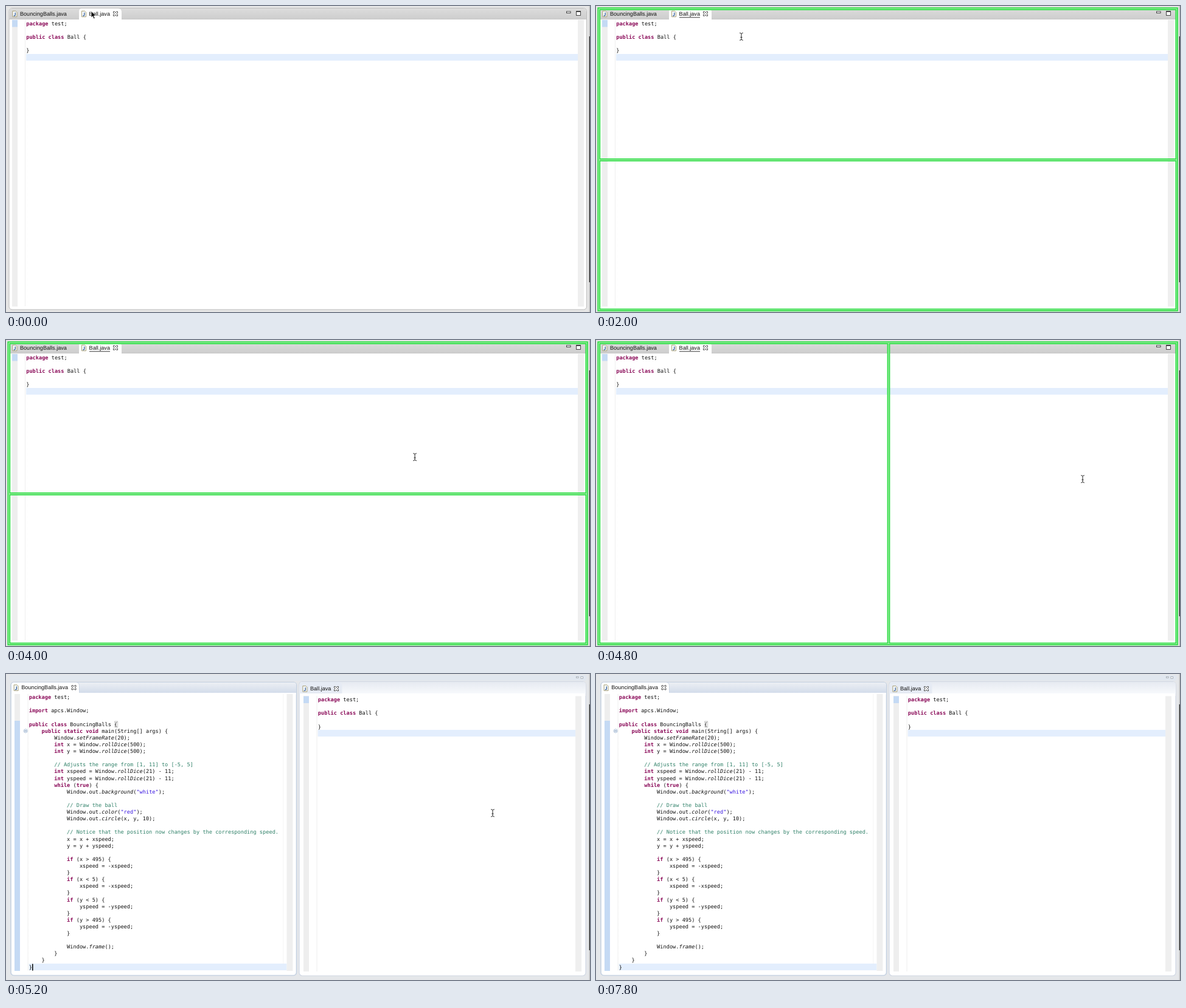
Animation of 960 by 504 pixels, one loop 8000 ms. Source, as an HTML page:

```html
<!DOCTYPE html>
<html lang="en">
<head>
<meta charset="utf-8">
<title>Splitting an editor by dragging a tab</title>
<style>
html, body { margin: 0; width: 100%; height: 100%; overflow: hidden; background: #e6e6e6; }
svg { display: block; width: 100%; height: 100%; }
text { text-rendering: geometricPrecision; white-space: pre; }
.code { font: 8.64px "DejaVu Sans Mono", monospace; fill: #111; }
.key { font-weight: bold; fill: #8a0a58; }
.str { fill: #3a18e0; }
.note { fill: #2f8068; }
.call { font-style: italic; }
.tab { font: 9.1px "Liberation Sans", Arial, sans-serif; fill: #111; }
</style>
</head>
<body>
<svg id="stage" viewBox="0 0 960 504">
  <defs>
    <linearGradient id="grayBar" x2="0" y2="1">
      <stop offset="0" stop-color="#dcdcdc"/><stop offset="1" stop-color="#cdcdcd"/>
    </linearGradient>
    <linearGradient id="blueBar" x2="0" y2="1">
      <stop offset="0" stop-color="#eceff4"/><stop offset="1" stop-color="#d3dcea"/>
    </linearGradient>
    <linearGradient id="paleBar" x2="0" y2="1">
      <stop offset="0" stop-color="#e6eaf1"/><stop offset="1" stop-color="#f7f9fc"/>
    </linearGradient>
  </defs>
</svg>
<script>
const LOOP = 8000, STEP = 200, LINE = 11.11;
const stage = document.getElementById('stage');

function add(parent, tag, attrs = {}, text) {
  const el = document.createElementNS('http://www.w3.org/2000/svg', tag);
  for (const k in attrs) el.setAttribute(k, attrs[k]);
  if (text !== undefined) el.textContent = text;
  parent.append(el);
  return el;
}
const group = (parent = stage) => add(parent, 'g');
const box = (g, x, y, width, height, fill, more) =>
  add(g, 'rect', { x, y, width, height, fill, ...more });
const path = (g, d, fill, stroke, more) =>
  add(g, 'path', { d, fill, stroke, ...more });
const show = (el, on) => el.setAttribute('visibility', on ? 'visible' : 'hidden');

const ballCode = `package test;

public class Ball {

}`;
const mainCode = `package test;

import apcs.Window;

public class BouncingBalls {
    public static void main(String[] args) {
        Window.setFrameRate(20);
        int x = Window.rollDice(500);
        int y = Window.rollDice(500);

        // Adjusts the range from [1, 11] to [-5, 5]
        int xspeed = Window.rollDice(21) - 11;
        int yspeed = Window.rollDice(21) - 11;
        while (true) {
            Window.out.background("white");

            // Draw the ball
            Window.out.color("red");
            Window.out.circle(x, y, 10);

            // Notice that the position now changes by the corresponding speed.
            x = x + xspeed;
            y = y + yspeed;

            if (x > 495) {
                xspeed = -xspeed;
            }
            if (x < 5) {
                xspeed = -xspeed;
            }
            if (y < 5) {
                yspeed = -yspeed;
            }
            if (y > 495) {
                yspeed = -yspeed;
            }

            Window.frame();
        }
    }
}`;

const TOKENS = new RegExp([
  '(?<note>//.*)', '(?<str>"[^"]*")',
  '(?<key>\\b(?:package|import|public|class|static|void|int|while|true|if)\\b)',
  '(?<call>(?<=\\.)\\w+(?=\\())'
].join('|'), 'g');

function code(g, source, x, y) {
  source.split('\n').forEach((line, i) => {
    if (!line) return;
    const row = add(g, 'text', { class: 'code', x, y: y + i * LINE });
    let at = 0;
    for (const m of line.matchAll(TOKENS)) {
      row.append(line.slice(at, m.index));
      const kind = Object.keys(m.groups).find(k => m.groups[k]);
      add(row, 'tspan', { class: kind }, m[0]);
      at = m.index + m[0].length;
    }
    row.append(line.slice(at));
  });
}

function fileIcon(g, x, y) {
  path(g, `M${x + .5} ${y + .5}h5l2 2v7.5h-7z`, '#f4f8fd', '#a39868', { 'stroke-width': .9 });
  path(g, `M${x + 4.8} ${y + 3}v4q0 1.6 -2.6 1.2`, 'none', '#2a5590', { 'stroke-width': 1.2 });
}

function closeIcon(g, x, y) {
  path(g, `M${x - 3.5} ${y - 3.5}h2l1.5 1.7l1.5 -1.7h2v2l-1.7 1.5l1.7 1.5v2h-2l-1.5 -1.7l-1.5 1.7h-2v-2l1.7 -1.5l-1.7 -1.5z`,
    '#fff', '#333', { 'stroke-width': .9 });
}

function tab(g, name, x, y, closeX) {
  fileIcon(g, x, y - 8);
  add(g, 'text', { class: 'tab', x: x + 12.6, y }, name);
  if (closeX) closeIcon(g, closeX, y - 3);
}

const tabShape = (g, x, y, w, h, fill, stroke) =>
  path(g, `M${x} ${y + h}V${y + 5}q0 -5 5 -5H${x + w - 6}q6 0 6 6V${y + h}z`, fill, stroke, { 'stroke-width': .8 });

// Rulers, current line and text of one editor
function editor(g, { left, top, bottom, right, text, source, base, mark, line }) {
  box(g, left, top, 9, bottom - top, '#eeeeee');
  box(g, left, mark[0], 9, mark[1] - mark[0], '#c5daf4');
  box(g, text, line, right - text, 11, '#e3eefd');
  path(g, `M${text - 1.5} ${top}V${bottom}`, 'none', '#d6d6d6', { 'stroke-width': .8, 'stroke-dasharray': '1 1' });
  box(g, right, top, 10, bottom - top, '#efefef');
  code(g, source, text + .2, base);
}

box(stage, 0, 0, 960, 504, '#e6e6e6');

// One editor stack
const single = group();
box(single, 5, 3.5, 949.5, 496.5, '#fff', { rx: 5, stroke: '#bdbdbd' });
path(single, 'M5.5 22V9q0 -5 5 -5H949q5 0 5 5V22z', 'url(#grayBar)');
path(single, 'M5 21.7H954', 'none', '#c2c2c2', { 'stroke-width': .7 });
tabShape(single, 120, 4, 70, 19, '#fff', 'none');
tab(single, 'BouncingBalls.java', 10.4, 15.8);
tab(single, 'Ball.java', 124, 15.8, 180);
box(single, 921.5, 9, 6.5, 2.6, '#fff', { stroke: '#333', 'stroke-width': .9 });
box(single, 937.5, 8.7, 7, 6.8, '#fff', { stroke: '#333', 'stroke-width': .9 });
box(single, 937.5, 8.3, 7, 1.6, '#333');
editor(single, {
  left: 10, top: 23, bottom: 495, right: 940, text: 33,
  source: ballCode, base: 31.6, mark: [23, 34.5], line: 79
});

// Drop previews
const drag = group();
box(drag, 137, 18.4, 34, .9, '#222');
const GREEN = '#32df49';
function preview(gap, halves) {
  const g = group(drag);
  path(g, 'M2.5 2.5H956.5V502.5H2.5zM7 7V499H953V7z', '#b4edb5', 'none', { 'fill-rule': 'evenodd' });
  box(g, ...gap, '#b4edb5');
  const line = { stroke: GREEN, 'stroke-width': 1.8 };
  box(g, 3.3, 3.2, 952.6, 498.8, 'none', line);
  for (const h of halves) box(g, ...h, 'none', line);
  return g;
}
const rows = preview([6, 252, 948, 3], [[6.3, 6, 947, 246], [6.3, 255, 947, 244.3]]);
const cols = preview([479.5, 6, 3, 493], [[6.3, 6, 473.2, 493.3], [482.5, 6, 470.8, 493.3]]);

// Two editors side by side
const split = group();
box(split, 0, 0, 960, 504, '#e5e7ea');
box(split, 5.5, 2, 949, 9, '#e1e7ef', { rx: 4 });
for (const x of [937.5, 945]) box(split, x, 4.5, 3.5, x > 940 ? 3 : 1.8, '#fff', { stroke: '#9ba3ad', 'stroke-width': .8 });

box(split, 8, 13.5, 469.5, 483, '#fff', { rx: 5, stroke: '#c6d2e2', 'stroke-width': 1.6 });
path(split, 'M8.5 31V18q0 -4 4 -4H473q4 0 4 4V31z', 'url(#blueBar)');
tabShape(split, 8.5, 13.5, 112, 19, '#fff', '#c3cedd');
box(split, 9, 31, 467.5, 3, '#fff');
tab(split, 'BouncingBalls.java', 12.6, 25.4, 111.5);
editor(split, {
  left: 14, top: 33, bottom: 489, right: 461.5, text: 37.6,
  source: mainCode, base: 41.2, mark: [77, 489], line: 477
});
path(split, 'M455.7 33V477', 'none', '#f0f0f0', { 'stroke-width': .8 });
add(split, 'circle', { cx: 32.2, cy: 93.8, r: 3, fill: '#eef4fb', stroke: '#9db4d0', 'stroke-width': .8 });
box(split, 30.4, 93.4, 3.6, .9, '#5d7ba2');
box(split, 178.7, 78, 5, 9.5, 'none', { stroke: '#aaa', 'stroke-width': .7 });

box(split, 482, 12.5, 471, 484.5, '#fff', { rx: 5, stroke: '#d0d8e4', 'stroke-width': 1.2 });
path(split, 'M482.5 32V17q0 -4 4 -4H949q4 0 4 4V32z', 'url(#paleBar)');
tabShape(split, 483, 13.5, 69.5, 19, '#e6ebf4', 'none');
box(split, 483, 32, 469.5, 4, '#fff');
tab(split, 'Ball.java', 487.4, 27.2, 543);
editor(split, {
  left: 489, top: 36.5, bottom: 490, right: 936, text: 512.6,
  source: ballCode, base: 45.2, mark: [36.5, 48], line: 92
});
const caret = box(split, 43, 477.5, 1.5, 11, '#000');

// Strip of the window behind, at the right edge
box(stage, 958.7, 0, 1.3, 504, '#bdbdbd');
box(stage, 958.7, 50, 1.3, 405, '#262626');

const arrow = path(stage, 'M0 0V10.6L2.5 8.3L4.3 12.6L6.2 11.8L4.4 7.6H7.7z', '#000', '#fff', { 'stroke-width': .8 });
const beam = path(stage, 'M-2.8 -6Q-.3 -6 0 -4.4Q.3 -6 2.8 -6M0 -4.4V4.4M-2.8 6Q-.3 6 0 4.4Q.3 6 2.8 6M-1.5 1.2H1.5',
  'none', '#222', { 'stroke-width': 1 });

// Pointer: time, x, y
const MOVES = [
  [0, 140, 8.5], [800, 145, 9.5], [1000, 145, 9.5], [1600, 156.3, 20],
  [2800, 475, 137], [3200, 475, 137], [4600, 800, 229], [5800, 800, 229], [6800, 975, 300], [LOOP, 975, 300]
];

function pointer(t) {
  const i = MOVES.findIndex(m => m[0] > t);
  const [t0, x0, y0] = MOVES[i - 1], [t1, x1, y1] = MOVES[i];
  const p = (t - t0) / (t1 - t0), e = p * p * (3 - 2 * p);
  return [x0 + (x1 - x0) * e, y0 + (y1 - y0) * e];
}

function draw(time) {
  const t = Math.floor(time % LOOP / STEP) * STEP;
  const [x, y] = pointer(t);
  const dragging = t >= 1800 && t < 5000;
  const right = 953 - x < y;
  show(single, t < 5000);
  show(drag, dragging);
  show(rows, dragging && !right);
  show(cols, dragging && right);
  show(split, t >= 5200);
  show(caret, t >= 5200 && Math.floor((t - 5200) / 500) % 2 === 0);
  show(arrow, t < 2000);
  show(beam, t >= 2000);
  for (const el of [arrow, beam]) el.setAttribute('transform', `translate(${x} ${y})`);
}

const start = performance.now();
function tick() {
  draw(performance.now() - start);
  requestAnimationFrame(tick);
}
draw(0);
requestAnimationFrame(tick);
</script>
</body>
</html>
```
